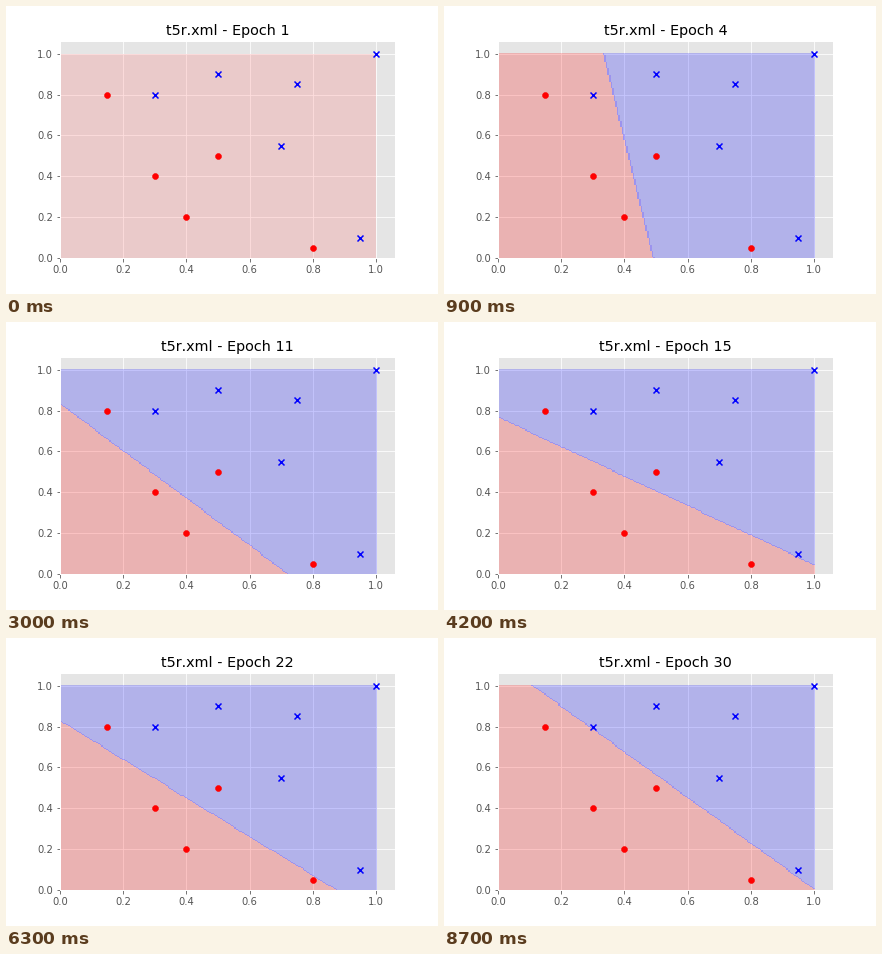
A matplotlib script for the animation above (9 s loop, 432x288 px).

```python
import numpy as np
import matplotlib.pyplot as plt
from matplotlib.animation import FuncAnimation

plt.style.use("ggplot")
plt.rcParams.update({"font.family": "DejaVu Sans", "text.kerning_factor": 6})

EPOCHS = 30
CELLS = 200
MARGIN = 1.05
MARKER = 3  # marker radius in pixels, counted in the view limits

RED_POINTS = [(0.15, 0.8), (0.3, 0.4), (0.4, 0.2), (0.5, 0.5), (0.8, 0.05)]
BLUE_POINTS = [(0.3, 0.8), (0.5, 0.9), (0.75, 0.85), (0.7, 0.55),
               (0.95, 0.1), (1, 1)]

# key epoch: intercepts of the decision line on the x and y axes
KEYS = {1: (1, 1), 4: (0.488, 3.1), 8: (0.578, 0.886), 15: (1.058, 0.763),
        19: (0.955, 0.786), 26: (0.78, 0.881), 29: (0.75, 0.9),
        30: (1, 1.117)}

PALE_RED = (1, 0.37, 0.37, 0.2)
RED = (1, 0, 0, 0.22)
BLUE = (0, 0, 1, 0.22)
SEAM = (0.1, 0, 1, 0.36)

centres = (np.arange(CELLS) + 0.5) / CELLS
gx, gy = np.meshgrid(centres, centres)


def weights(epoch):
    """Line weights: the inverse intercepts, linear between key epochs."""
    return [np.interp(epoch, list(KEYS), 1 / np.array(side))
            for side in zip(*KEYS.values())]


def regions(epoch):
    img = np.empty(gx.shape + (4,))
    if epoch == 1:
        img[:] = PALE_RED
        return img
    a, b = weights(epoch)
    blue = a * gx + b * gy > 1
    img[:] = RED
    img[blue] = BLUE
    # blue cells with red to the left or below
    seam = np.zeros_like(blue)
    seam[:, 1:] |= blue[:, 1:] & ~blue[:, :-1]
    seam[1:] |= blue[1:] & ~blue[:-1]
    img[seam] = SEAM
    return img


fig = plt.figure(figsize=(6, 4), dpi=72, facecolor="white")
fig.subplots_adjust(left=0.125, right=0.9, bottom=0.125, top=0.88)
ax = fig.add_subplot()
limits = [MARGIN * (1 + MARKER / size) for size in ax.bbox.size]

field = ax.imshow(regions(1), origin="lower", aspect="auto",
                  extent=(0, 1, 0, 1), interpolation="nearest", zorder=1)
ax.scatter(*zip(*RED_POINTS), c="red", marker="o", zorder=2)
ax.scatter(*zip(*BLUE_POINTS), c="blue", marker="x", zorder=2)
ticks = np.arange(6) / 5
ax.set(xticks=ticks, yticks=ticks)
title = ax.set_title("")


def draw(i):
    epoch = i + 1
    side = 0.998 if epoch == 1 else 1
    field.set_data(regions(epoch))
    field.set_extent((0, side, 0, side))
    ax.set(xlim=(0, limits[0]), ylim=(0, limits[1]))
    title.set_text(f"t5r.xml - Epoch {epoch}")
    return field, title


anim = FuncAnimation(fig, draw, frames=EPOCHS, interval=300,
                     repeat=True, repeat_delay=0, blit=False)
plt.show()
```
